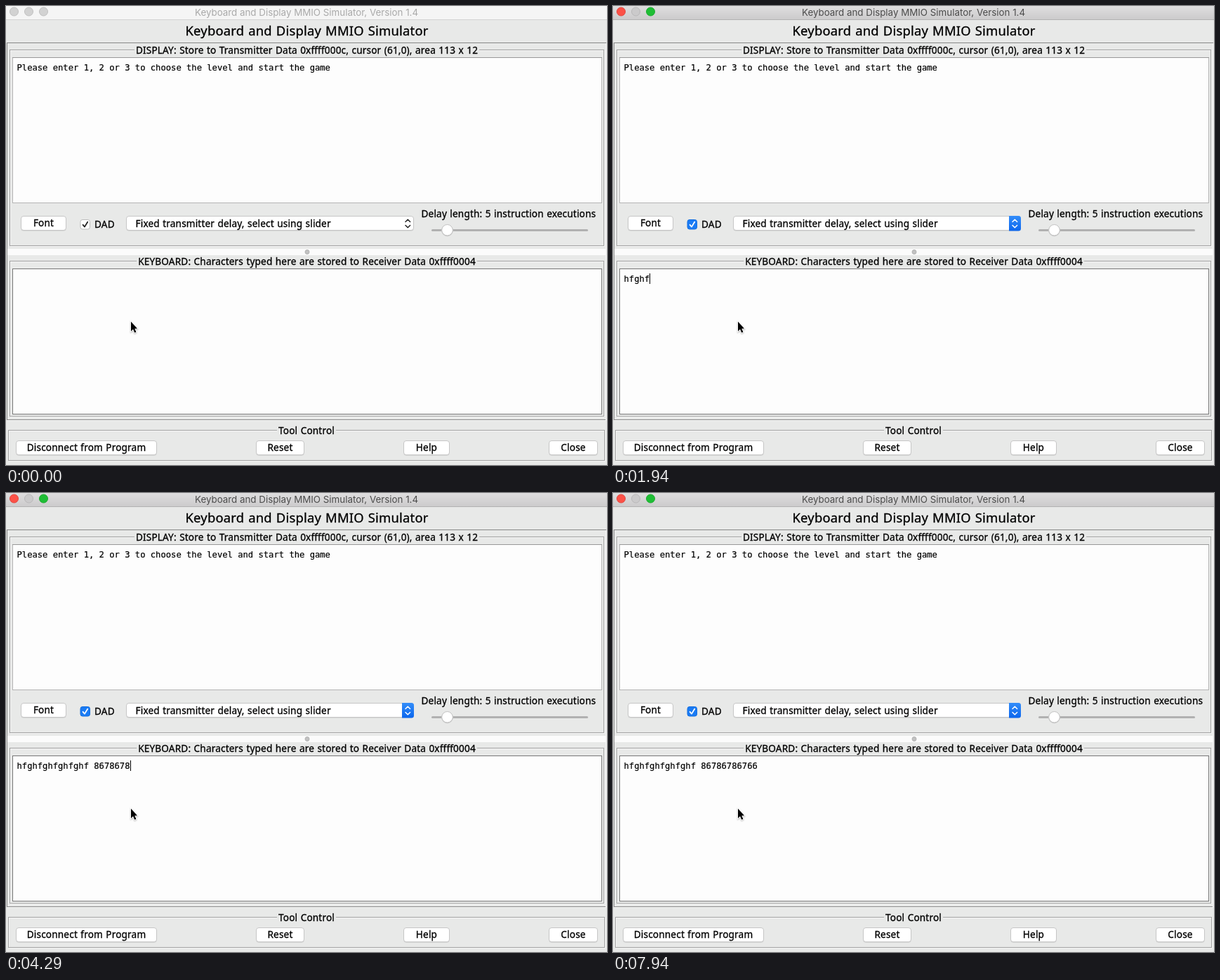
Write an HTML page with a canvas that moves like this. It is 856 px wide and 654 px high and loops after 8 s.

```html
<!DOCTYPE html>
<html lang="en">
<head>
<meta charset="utf-8">
<title>Keyboard and Display MMIO Simulator</title>
<style>
  html, body { margin: 0; width: 100%; height: 100%; overflow: hidden; background: #e8e9e8; }
  canvas { display: block; width: 856px; height: 654px; }
</style>
</head>
<body>
<canvas id="stage" width="856" height="654"></canvas>
<script>
const ctx = document.getElementById('stage').getContext('2d');
const LOOP = 8000;
const ACTIVATE = 120;   // window comes to the front
const FOCUS = 600;      // focus moves from the button to the text area
const BLINK = 500;
const PANEL = '#e8e9e8';

// Fonts: size, family, letter and word spacing in em, smoothing weight
const SANS = '"Noto Sans", sans-serif';
const UI = { size: 13.6, family: SANS, letter: 0.012, word: 0.05, bold: 0.3 };
const HEADING = { ...UI, size: 18.4 };
const TITLE = { size: 13.35, family: 'Inter, sans-serif', letter: 0, word: 0, bold: 0 };
const MONO = { size: 12.16, family: '"DejaVu Sans Mono", monospace', letter: 0, word: 0, bold: 0.2 };
const MONO_STEP = 7.32;

// Typing runs: text, first key time, time between keys
const RUNS = [
  ['hfghfghfghfghf', 1640, 72],
  [' 86786786766', 3100, 169]
];

function setFont({ size, family, letter, word }) {
  ctx.font = `${size}px ${family}`;
  ctx.letterSpacing = `${size * letter}px`;
  ctx.wordSpacing = `${size * word}px`;
}

function text(str, x, y, font = UI, align = 'left', color = '#000') {
  setFont(font);
  ctx.textAlign = align;
  ctx.fillStyle = color;
  ctx.fillText(str, x, y);
  if (font.bold) {
    ctx.strokeStyle = color;
    ctx.lineWidth = font.bold;
    ctx.strokeText(str, x, y);
  }
}

function rect(x, y, w, h, color) {
  ctx.fillStyle = color;
  ctx.fillRect(x, y, w, h);
}

function frame(x, y, w, h, color) {
  ctx.strokeStyle = color;
  ctx.lineWidth = 1;
  ctx.strokeRect(x + 0.5, y + 0.5, w, h);
}

function rounded(x, y, w, h, r, fill, stroke, width = 1) {
  ctx.beginPath();
  ctx.roundRect(x, y, w, h, r);
  if (fill) { ctx.fillStyle = fill; ctx.fill(); }
  if (stroke) { ctx.strokeStyle = stroke; ctx.lineWidth = width; ctx.stroke(); }
}

function disc(x, y, r, fill, stroke) {
  ctx.beginPath();
  ctx.arc(x, y, r, 0, Math.PI * 2);
  ctx.fillStyle = fill;
  ctx.fill();
  if (stroke) { ctx.strokeStyle = stroke; ctx.lineWidth = 1; ctx.stroke(); }
}

function path(points, color, width) {
  ctx.beginPath();
  points.forEach(([x, y]) => ctx.lineTo(x, y));
  ctx.strokeStyle = color;
  ctx.lineWidth = width;
  ctx.lineCap = ctx.lineJoin = 'round';
  ctx.stroke();
  ctx.lineCap = 'butt';
  ctx.lineJoin = 'miter';
}

function fade(y0, y1, from, to) {
  const shade = ctx.createLinearGradient(0, y0, 0, y1);
  shade.addColorStop(0, from);
  shade.addColorStop(1, to);
  return shade;
}

function group(label, x, y, w, h, baseline) {
  frame(x + 1, y + 1, w, h, '#f5f5f5');
  frame(x, y, w, h, '#a2a2a2');
  const mid = x + w / 2 + 0.5;
  setFont(UI);
  const half = ctx.measureText(label).width / 2 + 2;
  rect(mid - half, y - 1, half * 2, 4, PANEL);
  text(label, mid, baseline, UI, 'center');
}

function field(x, y, w, h) {
  rounded(x, y + 1, w, h, 3.5, '#c9c9c9');
  rounded(x, y, w, h, 3.5, '#fff', '#c6c6c6');
}

function button(label, x, y, w) {
  field(x + 0.5, y + 0.5, w, 20);
  text(label, x + w / 2 + 0.5, y + 15, UI, 'center');
}

function titleBar(active) {
  rect(0, 0, 856, 19, active ? fade(0, 19, '#dfdedf', '#cccbcc') : '#f5f5f5');
  rect(0, 19, 856, 1, active ? '#b2b2b2' : '#d3d3d3');
  const lights = active ? ['#fc5147', '#cbcacb', '#1fbe35'] : ['#d2d2d2', '#d2d2d2', '#d2d2d2'];
  const rims = active ? ['#e2463f', '#b9b8b9', '#1cab2f'] : ['#c0c0c0', '#c0c0c0', '#c0c0c0'];
  lights.forEach((c, i) => disc(11.5 + 21 * i, 8, 6, c, rims[i]));
  text('Keyboard and Display MMIO Simulator, Version 1.4', 428, 13.5, TITLE, 'center',
    active ? '#4b4b4b' : '#a9a9a9');
}

function displayPanel(active) {
  group('DISPLAY: Store to Transmitter Data 0xffff000c, cursor (61,0), area 113 x 12',
    5, 62, 846, 279, 68);
  rect(9, 73, 840, 208, '#fdfdfd');
  frame(9, 73, 839, 207, '#b4b4b4');
  rect(9, 73, 840, 1, '#989898');
  text('Please enter 1, 2 or 3 to choose the level and start the game', 15.5, 92, MONO);

  button('Font', 21, 299, 64);

  const ink = active ? '#fff' : '#222';
  rounded(106, 304.5, 13.5, 13.5, 3, active ? '#1a7bf4' : '#fff', active ? '#1670e0' : '#bcbcbc');
  path([[109.6, 311.8], [112, 314.6], [116.2, 307.8]], ink, 1.8);
  text('DAD', 126, 316);

  field(171.5, 299.5, 409, 20);
  if (active) {
    rounded(564, 299, 17, 21.5, [0, 3.5, 3.5, 0], fade(299, 321, '#338df9', '#0a65ed'));
  }
  path([[569, 307.5], [572.3, 304.2], [575.6, 307.5]], ink, 1.5);
  path([[569, 312.5], [572.3, 315.8], [575.6, 312.5]], ink, 1.5);
  text('Fixed transmitter delay, select using slider', 184.5, 315);

  text('Delay length: 5 instruction executions', 591.5, 301);
  rounded(606, 318, 223, 3, 1.5, '#b1b1b1');
  disc(628.5, 320, 8.2, '#c4c4c4');
  disc(628.5, 319.3, 7.8, '#fff', '#c2c2c2');
}

function divider() {
  rect(2, 346, 852, 9, '#fbfbfb');
  disc(429, 350.5, 3, '#c2c2c2', '#b2b2b2');
}

function typed(t) {
  let str = '';
  let lastEvent = FOCUS;
  for (const [run, start, step] of RUNS) {
    const count = Math.max(0, Math.min(run.length, Math.floor((t - start) / step) + 1));
    if (count) lastEvent = start + (count - 1) * step;
    str += run.slice(0, count);
  }
  const caret = t >= FOCUS && Math.floor((t - lastEvent) / BLINK) % 2 === 0;
  return { str, caret };
}

function keyboardPanel(t) {
  group('KEYBOARD: Characters typed here are stored to Receiver Data 0xffff0004',
    5, 363, 846, 221, 369);
  rect(9, 374, 840, 208, '#fdfdfd');
  frame(9, 374, 839, 207, '#777');
  const { str, caret } = typed(t);
  text(str, 15.5, 393, MONO);
  if (caret) rect(Math.round(15.6 + str.length * MONO_STEP), 381, 1, 15, '#000');
}

function toolPanel(t) {
  group('Tool Control', 3, 604, 849, 43, 610);
  button('Disconnect from Program', 14, 619, 200);
  if (t >= ACTIVATE && t < FOCUS) {
    rounded(14, 619, 200.5, 21, 4, null, '#6ba6e6', 1.6);
  }
  button('Reset', 356, 619, 68);
  button('Help', 566, 619, 65);
  button('Close', 773, 619, 69);
}

function pointer() {
  const shape = new Path2D('M178 449.8 V463.4 L181 460.6 L183.2 465.6 L185.4 464.6 L183.3 459.7 L187 459.5 Z');
  ctx.save();
  ctx.shadowColor = 'rgba(0,0,0,.3)';
  ctx.shadowBlur = 2;
  ctx.shadowOffsetY = 1;
  ctx.strokeStyle = '#fff';
  ctx.lineWidth = 1.8;
  ctx.stroke(shape);
  ctx.restore();
  ctx.fillStyle = '#000';
  ctx.fill(shape);
}

function draw(t) {
  const active = t >= ACTIVATE;
  rect(0, 0, 856, 654, PANEL);
  titleBar(active);
  text('Keyboard and Display MMIO Simulator', 428.5, 42, HEADING, 'center');
  frame(1, 52, 853, 537, '#888');
  rect(854, 53, 1, 537, '#f6f6f6');
  rect(2, 590, 853, 1, '#f8f8f8');
  displayPanel(active);
  divider();
  keyboardPanel(t);
  toolPanel(t);
  pointer();
}

const begin = performance.now();
function tick() {
  draw((performance.now() - begin) % LOOP);
  requestAnimationFrame(tick);
}
tick();
</script>
</body>
</html>
```
